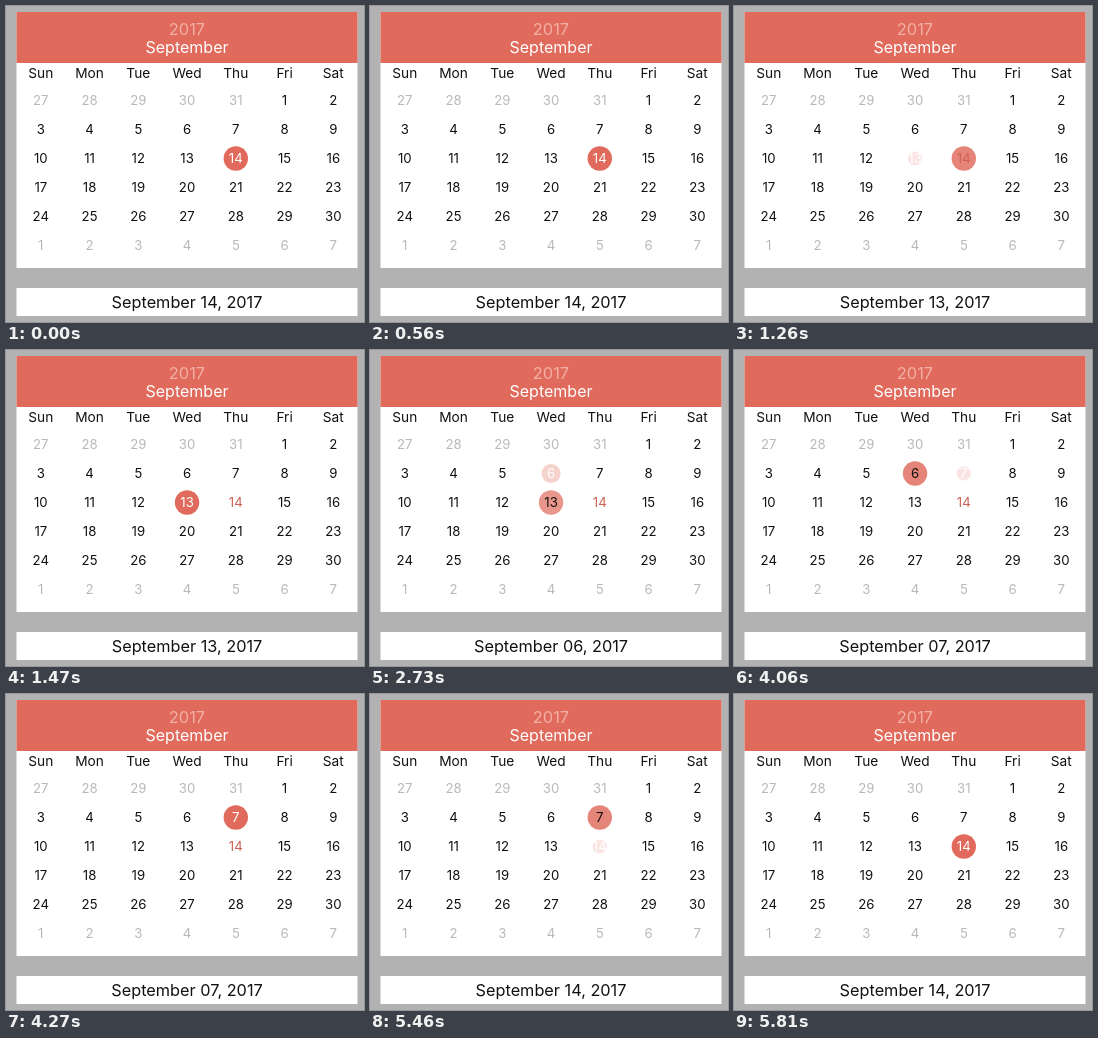
Write an HTML page with a canvas that moves like this. It is 358 by 316 pixels and loops after 6300 ms.

```html
<!DOCTYPE html>
<html lang="en">
<head>
<meta charset="utf-8">
<title>Calendar</title>
<style>
  html, body { margin: 0; width: 100%; height: 100%; overflow: hidden; background: #b2b2b2; }
  canvas { display: block; width: 358px; height: 316px; }
</style>
</head>
<body>
<canvas id="stage"></canvas>
<script>
const W = 358, H = 316, LOOP = 6300, STEP = 70;
const RED = '#e06a5b', TODAY_INK = '#cf6152', INK = '#111', FADED = '#b9b9b9';
const DAYS = ['Sun', 'Mon', 'Tue', 'Wed', 'Thu', 'Fri', 'Sat'];
const TODAY = 14, FADE = 200, RADIUS = 12.2;

// lead: how far the transition has run when it first shows
const PICKS = [
  { at: 1260, day: 13, lead: 35 },
  { at: 2730, day: 6, lead: 60 },
  { at: 4060, day: 7, lead: 35 },
  { at: 5460, day: 14, lead: 35 }
];

const canvas = document.getElementById('stage');
const ctx = canvas.getContext('2d');
const dpr = window.devicePixelRatio || 1;
canvas.width = W * dpr;
canvas.height = H * dpr;

const colX = c => 34.8 + c * 48.75;
const rowY = r => 94.5 + r * 29;

function rect(x, y, w, h, color) {
  ctx.fillStyle = color;
  ctx.fillRect(x, y, w, h);
}

function text(str, x, y, size, color) {
  ctx.font = `${size}px Inter, Roboto, sans-serif`;
  ctx.fillStyle = color;
  ctx.fillText(str, x, y);
}

function dot(day, radius, alpha) {
  const i = day + 4;
  ctx.globalAlpha = alpha;
  ctx.fillStyle = RED;
  ctx.beginPath();
  ctx.arc(colX(i % 7), rowY(Math.floor(i / 7)), radius, 0, Math.PI * 2);
  ctx.fill();
  ctx.globalAlpha = 1;
}

// grows past full size, then settles
function bounce(age) {
  if (age < 112) return 0.3 + 0.9 * age / 112;
  return Math.max(1, 1.2 - 0.2 * (age - 112) / 38);
}

function selection(t) {
  let day = TODAY, previous = null, age = LOOP;
  for (const p of PICKS) {
    if (t < p.at) break;
    previous = day;
    day = p.day;
    age = t - p.at + p.lead;
  }
  return { day, previous, age };
}

function drawDays(selected) {
  for (let i = 0; i < 42; i++) {
    const day = i - 4;
    const outside = day < 1 || day > 30;
    const label = day < 1 ? day + 31 : day > 30 ? day - 30 : day;
    let color = INK;
    if (outside) color = FADED;
    else if (day === selected) color = '#fff';
    else if (day === TODAY) color = TODAY_INK;
    text(label, colX(i % 7), rowY(Math.floor(i / 7)) + 4.6, 13.2, color);
  }
}

function draw(t) {
  const { day, previous, age } = selection(t);
  const fade = Math.min(1, age / FADE);

  ctx.setTransform(dpr, 0, 0, dpr, 0, 0);
  ctx.textAlign = 'center';
  ctx.textBaseline = 'alphabetic';
  rect(0, 0, W, H, '#b2b2b2');
  rect(10.5, 6, 341, 256, '#fff');
  rect(10.5, 6, 341, 51, RED);
  rect(10.5, 282, 341, 28, '#fff');

  text('2017', 181, 28.5, 16.4, '#f2b0a6');
  text('September', 181, 47, 16, '#fff');
  DAYS.forEach((name, c) => text(name, colX(c), 72.3, 13.7, INK));

  if (previous !== null && fade < 1) dot(previous, RADIUS, 1 - fade);
  dot(day, RADIUS * bounce(age), fade);
  drawDays(day);

  text(`September ${String(day).padStart(2, '0')}, 2017`, 181, 302, 16.3, INK);
}

function tick() {
  const t = performance.now() % LOOP;
  draw(Math.floor(t / STEP) * STEP);
  requestAnimationFrame(tick);
}
tick();
</script>
</body>
</html>
```
